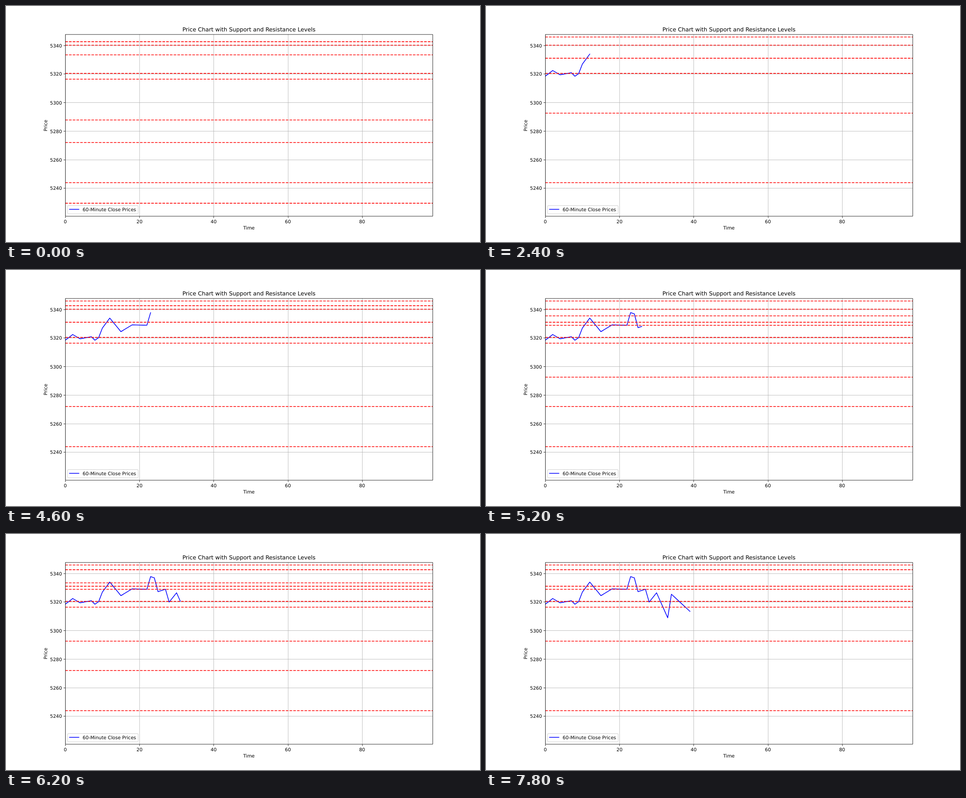
An HTML page for the animation above (8 s loop, 1058 by 529 pixels).

```html
<!DOCTYPE html>
<html lang="en">
<head>
<meta charset="utf-8">
<title>Price chart</title>
<style>
  html, body { margin: 0; width: 100%; height: 100%; overflow: hidden; background: #fff; }
  svg { display: block; width: 1058px; height: 529px; }
  text { font: 13.889px "DejaVu Sans", sans-serif; text-rendering: geometricPrecision; }
  .title { font-size: 16.667px; }
  .middle { text-anchor: middle; }
  .end { text-anchor: end; }
  path { fill: none; }
  .grid { stroke: #b0b0b0; stroke-width: 1.11; }
  .axis { stroke: #000; stroke-width: 1.11; }
  .price { stroke: #00f; stroke-width: 2.083; stroke-linejoin: round; stroke-linecap: square; }
  .levels { stroke: #f00; stroke-width: 2.083; stroke-dasharray: 7.708 3.333; }
</style>
</head>
<body>
<svg viewBox="0 0 1400 700">
  <clipPath id="plot"><rect x="175" y="84" width="1085" height="540"/></clipPath>
  <path id="grid" class="grid"/>
  <path id="ticks" class="axis"/>
  <g clip-path="url(#plot)">
    <path id="price" class="price"/>
    <path id="levels" class="levels"/>
  </g>
  <path class="axis" d="M175.5 84.5H1260.5V623.5H175.5Z"/>
  <g id="labels"></g>
  <text class="title middle" x="717.5" y="76">Price Chart with Support and Resistance Levels</text>
  <text class="middle" x="717.5" y="663.3">Time</text>
  <text class="middle" transform="translate(122 354.5) rotate(-90)">Price</text>
  <rect x="182" y="592" width="208.3" height="24.5" rx="2.8" fill="#fff" fill-opacity=".8" stroke="#ccc" stroke-opacity=".8" stroke-width="1.39"/>
  <path class="price" d="M187.5 603H215.3"/>
  <text x="226.4" y="608.3">60-Minute Close Prices</text>
</svg>
<script>
const STEP = 200, STEPS = 40;

// Turning points of the price; it runs straight between them
const turns = [
  [0, 5318.5], [2, 5322.5], [4, 5319.5], [7, 5321], [8, 5318.5], [9, 5320.3], [10, 5327],
  [12, 5334], [15, 5324.5], [18, 5329.2], [22, 5329], [23, 5337.8], [24, 5337], [25, 5327.3],
  [27, 5329], [28, 5320], [30, 5326.5], [33, 5309], [34, 5325.5], [39, 5313.5]
];

// Support and resistance levels, each with the refreshes that show it
const levels = {
  5346:   "..#######",
  5342.6: "###..#.##",
  5340.4: "#######..",
  5335.6: "..#...#..",
  5333.4: "##.....#.",
  5331.1: "...######",
  5329:   "......###",
  5320.5: "#########",
  5316.4: "###..####",
  5292.6: "...##.###",
  5287.8: "##.......",
  5272.2: "##...###.",
  5244.1: "#########",
  5229.5: "##......."
};

const byId = id => document.getElementById(id);
const setPath = (id, d) => byId(id).setAttribute("d", d);
const xOf = time => 175 + time * 1085 / 99;
const yOf = price => 117.2 + (5340 - price) * 4.2375;

function priceAt(time) {
  const next = Math.max(1, turns.findIndex(([t]) => t >= time));
  const [[t0, p0], [t1, p1]] = turns.slice(next - 1, next + 1);
  return p0 + (p1 - p0) * (time - t0) / (t1 - t0);
}

function drawAxes() {
  let grid = "", ticks = "", labels = "";
  for (let time = 0; time <= 80; time += 20) {
    const x = Math.round(xOf(time)) + 0.5;
    grid += `M${x} 84V624`;
    ticks += `M${x} 624v4.86`;
    labels += `<text class="middle" x="${xOf(time)}" y="644">${time}</text>`;
  }
  for (let price = 5240; price <= 5340; price += 20) {
    const y = Math.floor(yOf(price)) + 0.5;
    grid += `M175 ${y}H1260`;
    ticks += `M175 ${y}h-4.86`;
    labels += `<text class="end" x="165.3" y="${y + 5.3}">${price}</text>`;
  }
  setPath("grid", grid);
  setPath("ticks", ticks);
  byId("labels").innerHTML = labels;
}

let shown = -1;
function render(now) {
  const step = Math.floor(now / STEP) % STEPS;
  if (step !== shown) {
    shown = step;
    const points = Array.from({ length: step + 1 }, (_, i) => `${xOf(i)} ${yOf(priceAt(i))}`);
    setPath("price", step ? "M" + points.join("L") : "");

    const refresh = Math.floor((step + 4) / 5);
    const active = Object.keys(levels).filter(price => levels[price][refresh] === "#");
    setPath("levels", active.map(price => `M175 ${Math.round(yOf(price))}H1260`).join(""));
  }
  requestAnimationFrame(render);
}

drawAxes();
render(performance.now());
</script>
</body>
</html>
```
